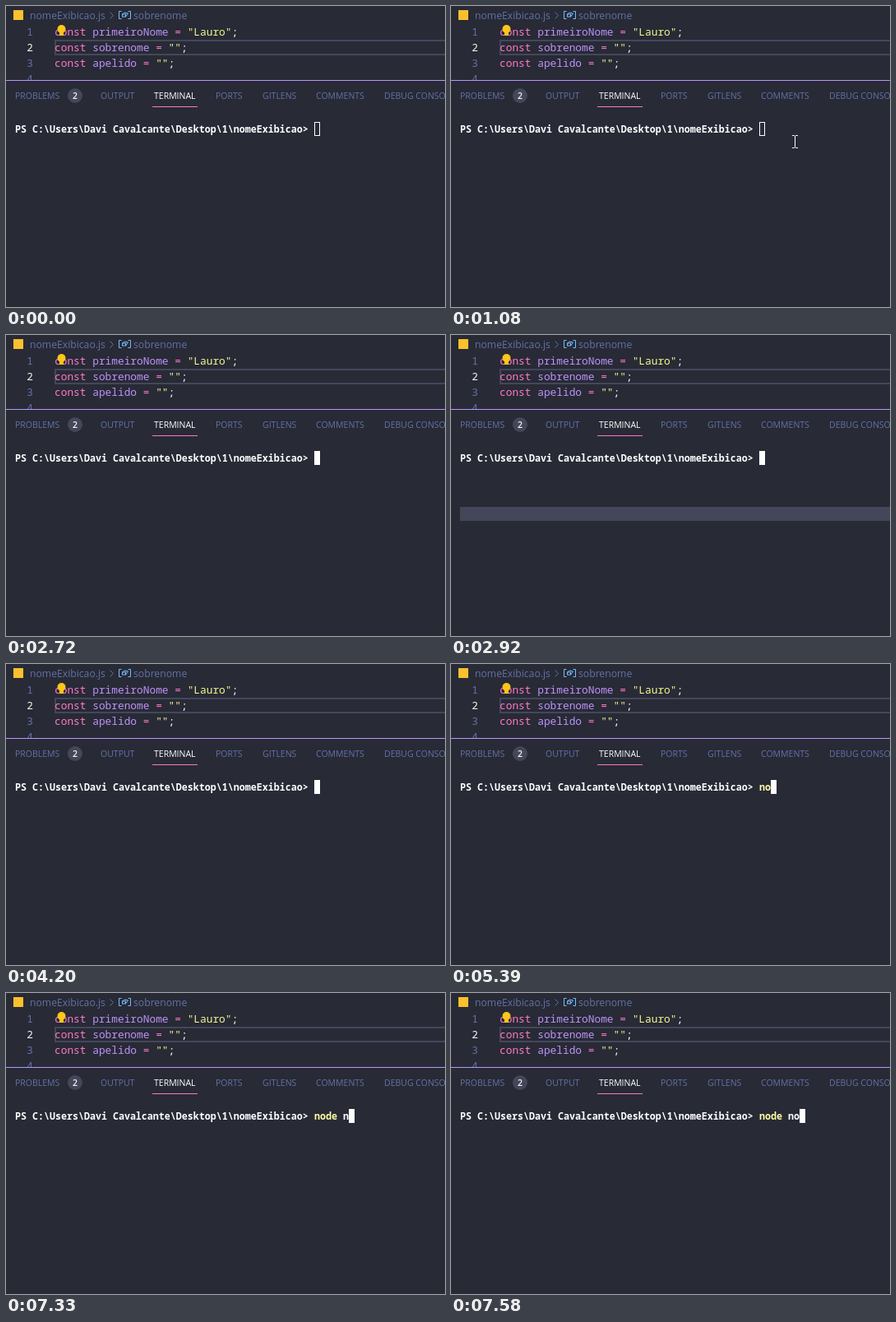
Animation of 534 by 366 pixels, one loop 8000 ms. Source, as an HTML page with a canvas:

```html
<!DOCTYPE html>
<html lang="pt">
<head>
<meta charset="utf-8">
<title>Terminal</title>
<style>
html, body { margin: 0; width: 100%; height: 100%; overflow: hidden; background: #282a36; }
canvas { display: block; width: 534px; height: 366px; }
</style>
</head>
<body>
<canvas id="stage" width="534" height="366"></canvas>
<script>
const W = 534, H = 366, LOOP = 8000;
const ctx = document.getElementById("stage").getContext("2d");
const BG = "#282a36", WHITE = "#ffffff", SOFT = "#f8f8f2", MUTED = "#6272a4", SHADE = "#44475a";
const PINK = "#ff79c6", PURPLE = "#bd93f9", STRING = "#f1fa8c", COMMAND = "#ffffa5";
const ICON = "#75beff", BULB = "#ffc61a", YELLOW = "#fbc02d";
const MONO = "'Noto Sans Mono', 'DejaVu Sans Mono', monospace";
const SANS = "'Open Sans', 'Noto Sans', sans-serif";
const CODE_FONT = `500 12.83px ${MONO}`;
const TERM_FONT = `600 11.67px ${MONO}`;
const PATH_FONT = `12.2px ${SANS}`;
const TAB_FONT = `10.5px ${SANS}`;

const LEFT = 11, CELL = 7, LINE = 19, TAB_GAP = 24, BADGE = 26;
const PROMPT = "PS C:\\Users\\Davi Cavalcante\\Desktop\\1\\nomeExibicao> ";
const TABS = ["PROBLEMS", "OUTPUT", "TERMINAL", "PORTS", "GITLENS", "COMMENTS", "DEBUG CONSOLE"];
const VARIABLES = { primeiroNome: "Lauro", sobrenome: "", apelido: "" };

// Bursts of typing: text, first key, ms per key
const BURSTS = [["no", 5320, 70], ["de ", 5730, 195], ["no", 7330, 210]];

// Pointer stops, with the screen sampled every STEP ms
const STEP = 69;
const STOPS = [
  { t: 804, x: 435, y: 321 }, { t: 942, x: 327, y: 202 },
  { t: 1080, x: 418, y: 165 }, { t: 1287, x: 442, y: 148 },
  { t: 1563, x: 428, y: 170 }, { t: 1770, x: 494, y: 184 },
  { t: 1977, x: 413, y: 181 }, { t: 2260, x: 422, y: 186 }
];

function rect(x, y, w, h, color) {
  ctx.fillStyle = color;
  ctx.fillRect(x, y, w, h);
}

function disc(x, y, r, color) {
  ctx.fillStyle = color;
  ctx.beginPath();
  ctx.arc(x, y, r, 0, Math.PI * 2);
  ctx.fill();
}

function line(color, ...points) {
  ctx.strokeStyle = color;
  ctx.lineWidth = 1;
  ctx.beginPath();
  points.forEach(([x, y]) => ctx.lineTo(x, y));
  ctx.stroke();
}

// Draws text and returns the x where it ends
function text(str, x, y, font, color, align = "left") {
  ctx.font = font;
  ctx.fillStyle = color;
  ctx.textAlign = align;
  ctx.fillText(str, x, y);
  return x + ctx.measureText(str).width;
}

function drawSymbol(cx, cy) {
  for (const side of [-1, 1]) {
    const edge = cx + side * 7;
    line(ICON, [edge - side * 3, cy - 4.5], [edge, cy - 4.5], [edge, cy + 4.5], [edge - side * 3, cy + 4.5]);
  }
  ctx.strokeRect(cx - 3, cy - 1, 4, 3);
  line(ICON, [cx - 3, cy - 1], [cx, cy - 3], [cx + 4, cy - 2], [cx + 1, cy + 2]);
}

function drawBreadcrumb() {
  rect(9, 5, 12, 12, YELLOW);
  text("nomeExibicao.js", 29, 16, PATH_FONT, MUTED);
  line(MUTED, [126.5, 7.5], [130.5, 11.5], [126.5, 15.5]);
  drawSymbol(144.5, 11);
  text("sobrenome", 155, 16, PATH_FONT, MUTED);
}

function drawEditor() {
  ctx.strokeStyle = SHADE;
  ctx.lineWidth = 2;
  ctx.strokeRect(60, 42, W, 17);
  for (let i = 0; i < 4; i++) {
    text(i + 1, 33, 36 + i * LINE, CODE_FONT, i === 1 ? SOFT : MUTED, "right");
  }
  Object.entries(VARIABLES).forEach(([name, value], i) => {
    const parts = [["const ", PINK], [name, PURPLE], [" = ", PINK], [`"${value}"`, STRING], [";", SOFT]];
    parts.reduce((x, [str, color]) => text(str, x, 36 + i * LINE, CODE_FONT, color), 59);
  });
  disc(67.5, 28, 5, BULB);
  rect(65, 31, 5, 5, BULB);
}

function drawTabs() {
  rect(0, 90, W, H - 90, BG);
  rect(0, 90, W, 1, PURPLE);
  let x = LEFT;
  for (const label of TABS) {
    const active = label === "TERMINAL";
    const end = text(label, Math.round(x), 113, TAB_FONT, active ? WHITE : MUTED);
    if (active) rect(178, 122, 55, 1, PINK);
    x = end + TAB_GAP + (label === "PROBLEMS" ? BADGE : 0);
  }
  disc(84, 109, 9, SHADE);
  text("2", 84, 113, `600 10.5px ${SANS}`, SOFT, "center");
}

function typedAt(t) {
  return BURSTS.map(([str, at, gap]) =>
    str.slice(0, Math.max(0, Math.floor((t - at) / gap) + 1))).join("");
}

function drawTerminal(t) {
  const typed = typedAt(t);
  const start = LEFT + PROMPT.length * CELL;
  const cursor = start + typed.length * CELL;
  if (t >= 2920 && t < 4200) rect(LEFT, 209, W, 17, SHADE);
  text(PROMPT, LEFT, 154, TERM_FONT, WHITE);
  text(typed.slice(0, 4), start, 154, TERM_FONT, COMMAND);
  text(typed.slice(4), start + 4 * CELL, 154, TERM_FONT, WHITE);
  rect(cursor, 141, CELL, 17, WHITE);
  if (t < 2720) rect(cursor + 1, 142, CELL - 2, 15, BG);
}

function drawPointer(t) {
  const first = STOPS[0].t;
  const now = first + Math.floor((t - first) / STEP) * STEP;
  const i = STOPS.findIndex(stop => stop.t > now);
  if (i < 1 || t >= STOPS[STOPS.length - 1].t) return;
  const a = STOPS[i - 1], b = STOPS[i];
  const f = (now - a.t) / (b.t - a.t);
  const ease = f * f * (3 - 2 * f);
  const x = Math.round(a.x + (b.x - a.x) * ease);
  const y = Math.round(a.y + (b.y - a.y) * ease);
  rect(x, y - 7, 1, 14, WHITE);
  for (const edge of [y - 8, y + 7]) {
    rect(x - 3, edge, 3, 1, WHITE);
    rect(x + 1, edge, 3, 1, WHITE);
  }
}

function draw(t) {
  rect(0, 0, W, H, BG);
  drawBreadcrumb();
  drawEditor();
  drawTabs();
  drawTerminal(t);
  drawPointer(t);
}

const began = performance.now();
function tick() {
  draw((performance.now() - began) % LOOP);
  requestAnimationFrame(tick);
}
tick();
</script>
</body>
</html>
```
